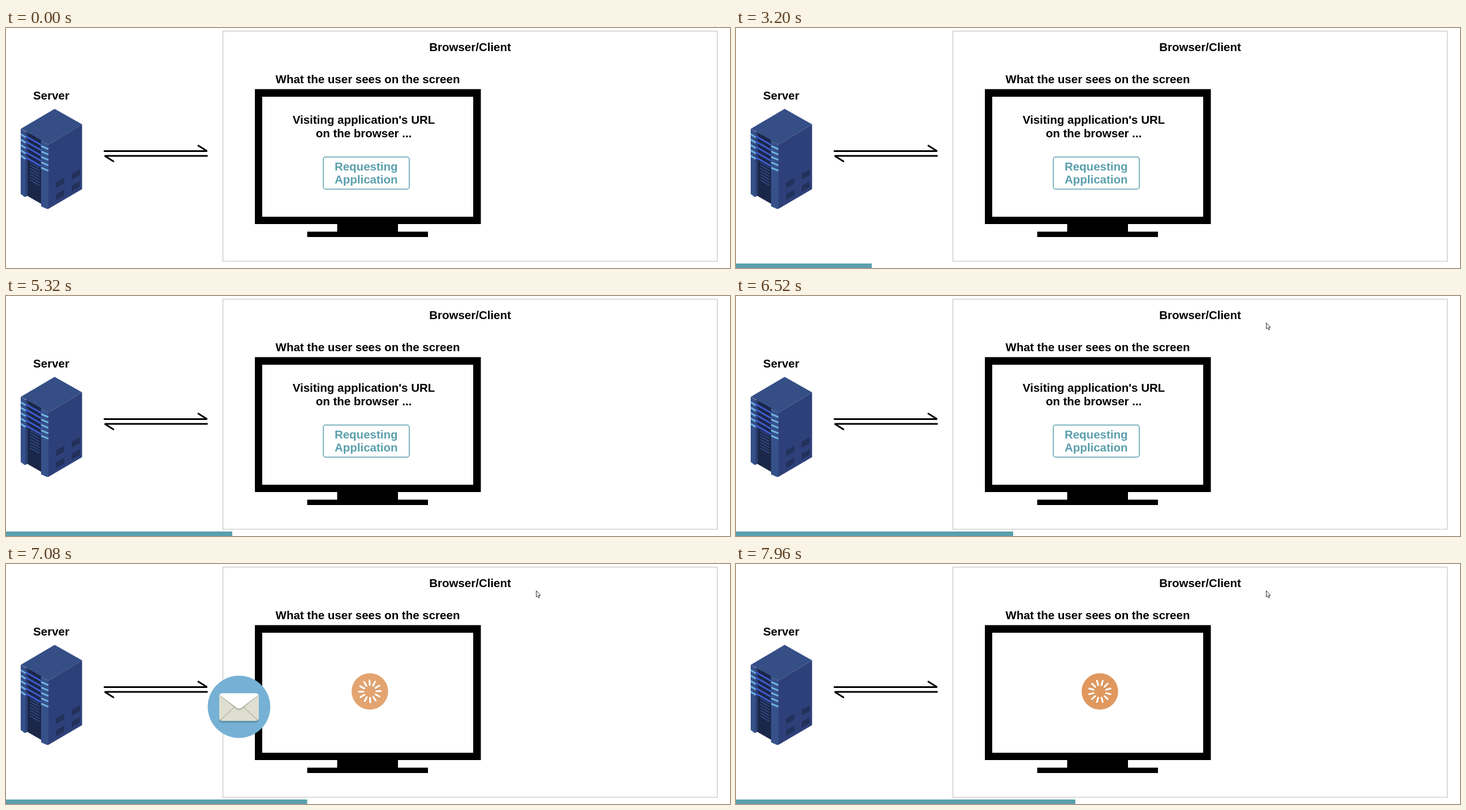
Animation of 1280x426 px, one loop 8000 ms. Source, as an HTML page:

```html
<!DOCTYPE html>
<html lang="en">
<head>
<meta charset="utf-8">
<title>Requesting an application</title>
<style>
html, body { margin: 0; width: 100%; height: 100%; overflow: hidden; background: #fff; }
svg { display: block; width: 1280px; height: 426px; }
text { font: bold 20.5px "Liberation Sans", Arial, sans-serif; text-anchor: middle; }
</style>
</head>
<body>
<svg viewBox="0 0 1280 426">
  <rect x="383.5" y="5.5" width="874" height="408.5" fill="none" stroke="#bbb"/>
  <text x="820.5" y="41">Browser/Client</text>
  <text x="639.5" y="98">What the user sees on the screen</text>
  <text x="80" y="127">Server</text>

  <g id="server">
    <path fill="#354f86" d="M26 179 86 143.5 134.5 171 75 207 62 201 38 185Z"/>
    <path fill="#2e4079" d="M75 207 134.5 171V286L75 321Z"/>
    <path fill="#1b2748" d="M36 184 62 199V312L36 297Z"/>
    <path fill="#36508a" d="M26 179 35 184V299L33 300 26 294.500Z"/>
    <path fill="#2a3f72" d="M34.500 185 38.500 183V297L34.500 300Z"/>
    <path fill="#36508a" d="M62 201 75 207V321L72 321 62 316.500Z"/>
  </g>

  <path d="M174 218.500H355.500L340 208.800M355.500 227H174.500L190 236.800" fill="none" stroke="#000" stroke-width="2.800" stroke-linecap="round" stroke-linejoin="bevel"/>

  <path fill-rule="evenodd" d="M440 108.500H839.500V348H693V361.500H746V371H532.500V361.500H585.500V348H440ZM453 122V335H826V122Z"/>

  <g id="request">
    <text x="632.5" y="170">Visiting application's URL</text>
    <text x="632.5" y="193.500">on the browser ...</text>
    <rect x="561" y="229" width="152" height="57" rx="4" fill="none" stroke="#5a9fad" stroke-width="1.500"/>
    <g fill="#5a9fad">
      <text x="636.700" y="253">Requesting</text>
      <text x="636.700" y="276">Application</text>
    </g>
  </g>

  <g id="spinner" transform="translate(643.300 226.200)">
    <circle r="32.300" fill="#e0985e"/>
    <g id="spokes" stroke-width="3.200" stroke-linecap="round"></g>
  </g>

  <g id="envelope">
    <circle r="55.300" fill="#76b1d5"/>
    <rect x="-35" y="-21" width="70" height="49" rx="5" fill="#5d8fae"/>
    <rect x="-35" y="-24" width="70" height="49" rx="5" fill="#dfdfd1"/>
    <path d="M-33 24-8 0M33 24 8 0" stroke="#b5b5a6" stroke-width="1.300"/>
    <path d="M-34-20-5 4Q0 8 5 4L34-20" fill="#b5b5a6"/>
    <path d="M-34-21Q-33-24-30-24H30Q33-24 34-21L5 1Q0 5-5 1Z" fill="#fff"/>
  </g>

  <rect id="bar" y="418" height="8" fill="#5a9fad"/>
  <path id="cursor" d="M.500.500V11.500L3 9.200 4.800 13.300 6.500 12.500 4.800 8.700H8Z" fill="#fff" stroke="#333" stroke-width="1"/>
</svg>
<script>
const $ = id => document.getElementById(id);
const show = (id, on) => $(id).setAttribute('visibility', on ? 'visible' : 'hidden');
const move = (id, x, y) => $(id).setAttribute('transform', `translate(${x} ${y})`);
const repeat = (n, f) => Array.from({ length: n }, (_, i) => f(i)).join('');
const strokes = (color, width, d) => `<path d="${d}" stroke="${color}" stroke-width="${width}"/>`;

// Server lights, grille and side vents
const vent = (x, y) => repeat(5, i => `M${x + i * 2.9} ${y - i * 1.6}v10.500`);
$('server').innerHTML +=
  strokes('#6fb1e0', 3, repeat(5, i => `M26 ${188.5 + i * 9.6}l9 5.500`)) +
  strokes('#3f5bd0', 3, repeat(5, i => `M35 ${192 + i * 9.4}l27 15.500`)) +
  strokes('#6fb1e0', 3, repeat(5, i => `M62 ${209.5 + i * 9.6}l13 5.500`)) +
  strokes('#2f4680', 2, repeat(7, i => `M43 ${239 + i * 5.2}l16 9`)) +
  strokes('#1b2748', 1.7, vent(90, 273) + vent(90, 294) + vent(117.500, 258) + vent(117.500, 279));

const rays = repeat(12, i => `<path d="M0-11.500V-19.500" transform="rotate(${i * 30})"/>`);
$('spokes').innerHTML = `<g stroke="#c98750" transform="translate(.7 1)">${rays}</g><g stroke="#fff">${rays}</g>`;

const LOOP = 8000, TICK = 40, CLICK = 6760;
const clamp = v => Math.min(1, Math.max(0, v));
const easeOut = v => 1 - (1 - clamp(v)) ** 2;

function draw(t) {
  const width = t < TICK ? 0 : Math.max(2.5, 2.5 * Math.floor((0.0757 * t - 2.2) / 2.5));
  $('bar').setAttribute('width', width);

  const enter = easeOut((t - 5600) / 480);
  show('cursor', t >= 5600);
  move('cursor', 930 + 7 * enter, 1 + 46 * enter);

  show('request', t < CLICK);
  show('spinner', t >= CLICK);
  $('spinner').setAttribute('opacity', 0.84 + 0.16 * clamp((t - CLICK) / 1200));
  $('spokes').setAttribute('transform', `rotate(${15 + 0.36 * (t - 7960)})`);

  show('envelope', t >= CLICK && t < 7940);
  move('envelope', 637 - 482 * easeOut((t - 6740) / 1260), 253.5);
}

const start = performance.now();
function frame() {
  const t = (performance.now() - start) % LOOP;
  draw(Math.floor(t / TICK) * TICK);
  requestAnimationFrame(frame);
}
frame();
</script>
</body>
</html>
```
